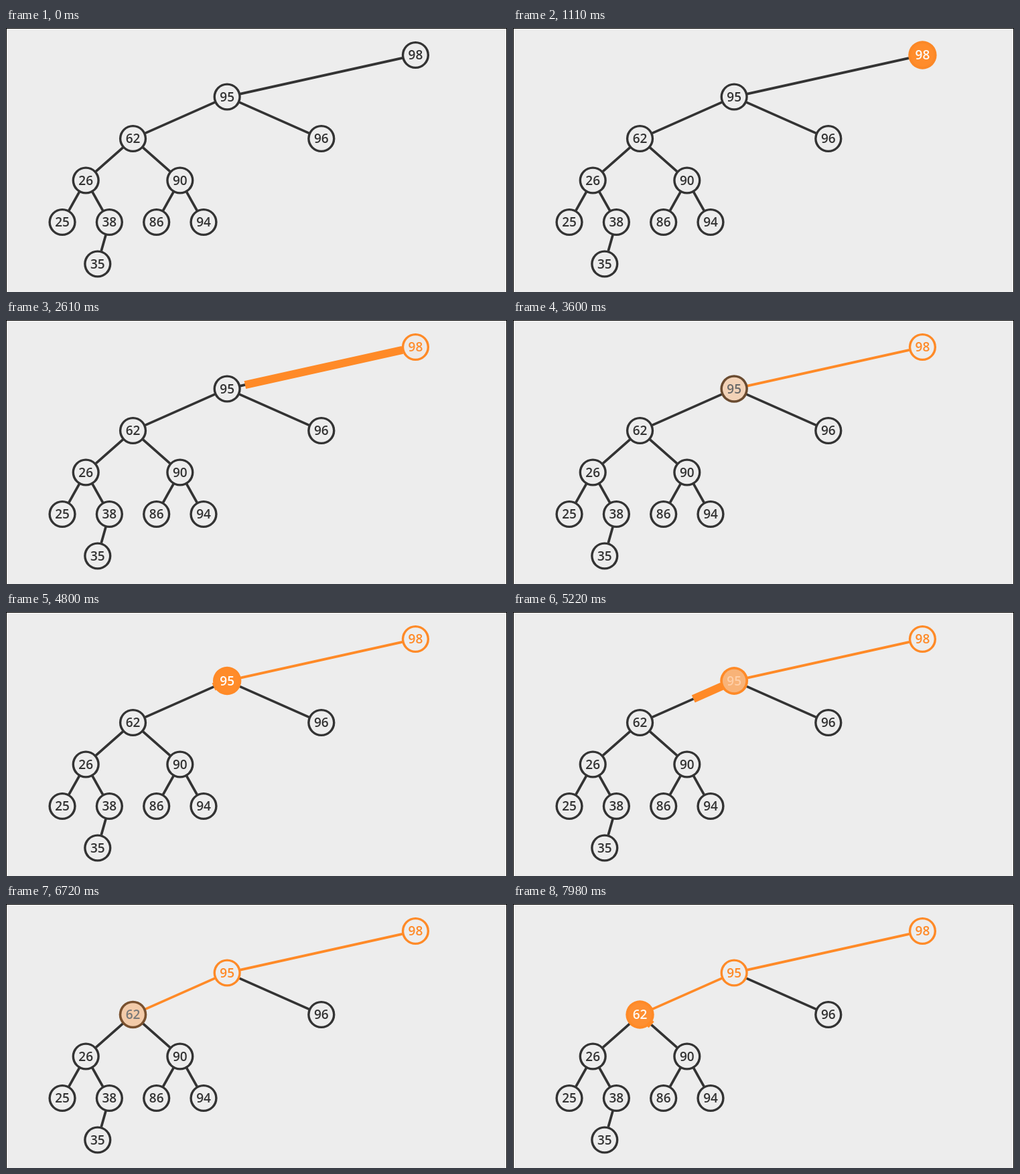
An HTML page with a canvas for the animation above (8 s loop, 748x395 px).

```html
<!DOCTYPE html>
<html lang="en">
<head>
<meta charset="utf-8">
<title>Tree search</title>
<style>
  html, body { margin: 0; width: 100%; height: 100%; overflow: hidden; background: #ededed; }
  canvas { display: block; width: 748px; height: 395px; }
</style>
</head>
<body>
<canvas id="stage"></canvas>
<script>
const W = 748, H = 395, LOOP = 8000;
const STEP = 1537.5, FIRST = -37, DURATION = 1380;
const RIM = 20, RING = 20.6, INNER = 17.2;
const BG = [237, 237, 237], DARK = [51, 51, 51], ORANGE = [255, 138, 39], WHITE = [255, 255, 255];

const canvas = document.getElementById('stage');
const ctx = canvas.getContext('2d');
const dpr = window.devicePixelRatio || 1;
canvas.width = Math.round(W * dpr);
canvas.height = Math.round(H * dpr);

// Each child sits half the previous horizontal gap away from its parent.
const nodes = [], edges = [];
function plant([value, left, right], x = 611.4, depth = 0) {
  const node = { value, x, y: 40.5 + depth * 62.5 };
  nodes.push(node);
  const gap = 281.25 / 2 ** depth;
  [[left, -1], [right, 1]].forEach(([child, side]) => {
    if (child) edges.push({ from: node, to: plant(child, x + side * gap, depth + 1) });
  });
  return node;
}
plant([98,
  [95,
    [62,
      [26, [25], [38, [35]]],
      [90, [86], [94]]],
    [96]]]);

// Search path: visiting a node and walking to the next one alternate.
const path = [98, 95, 62, 90];

const mix = (a, b, k) => a.map((v, i) => v + (b[i] - v) * k);
const css = c => `rgb(${c.map(Math.round).join(',')})`;
const ease = u => u < 0.5 ? 4 * u ** 3 : 1 - 4 * (1 - u) ** 3;

function progress(step, t) {
  const u = (t - FIRST - step * STEP) / DURATION;
  return ease(Math.min(1, Math.max(0, u)));
}

function line(x1, y1, x2, y2, width, color) {
  ctx.lineWidth = width;
  ctx.strokeStyle = css(color);
  ctx.beginPath();
  ctx.moveTo(x1, y1);
  ctx.lineTo(x2, y2);
  ctx.stroke();
}

function disc(x, y, r, color) {
  ctx.fillStyle = css(color);
  ctx.beginPath();
  ctx.arc(x, y, r, 0, Math.PI * 2);
  ctx.fill();
}

function drawEdge({ from, to }, t) {
  const dx = to.x - from.x, dy = to.y - from.y, len = Math.hypot(dx, dy);
  const ux = dx / len, uy = dy / len;
  const x = from.x + ux * RIM, y = from.y + uy * RIM;
  const span = len - 2 * RIM;
  const i = path.indexOf(from.value);
  const walked = i >= 0 && path[i + 1] === to.value ? progress(2 * i + 1, t) : 0;

  line(x, y, x + ux * span, y + uy * span, 3.75, walked === 1 ? ORANGE : DARK);
  if (walked > 0 && walked < 1) {
    line(x, y, x + ux * span * walked, y + uy * span * walked, 12, ORANGE);
  }
}

function drawNode({ value, x, y }, t) {
  const i = path.indexOf(value);
  const lit = i < 0 ? 0 : progress(2 * i, t);
  const left = i < 0 ? 0 : progress(2 * i + 1, t);

  disc(x, y, RING + 0.6 * lit * (1 - left), mix(DARK, ORANGE, lit));
  disc(x, y, INNER, mix(mix(BG, ORANGE, lit), BG, left));
  ctx.fillStyle = css(mix(mix(DARK, WHITE, lit), ORANGE, left));
  ctx.fillText(value, x, y + 6.6);
}

function draw(t) {
  ctx.setTransform(dpr, 0, 0, dpr, 0, 0);
  ctx.fillStyle = css(BG);
  ctx.fillRect(0, 0, W, H);
  ctx.font = '600 19px "Open Sans", "Noto Sans", sans-serif';
  ctx.textAlign = 'center';
  ctx.textBaseline = 'alphabetic';

  edges.forEach(e => drawEdge(e, t));
  nodes.forEach(n => drawNode(n, t));

  ctx.fillStyle = '#000';
  ctx.fillRect(0, 0, W, 1);
  ctx.fillRect(0, 0, 1, H);
  ctx.fillRect(W - 1, 0, 1, H);
}

const start = performance.now();
function tick() {
  draw((performance.now() - start) % LOOP);
  requestAnimationFrame(tick);
}
tick();
</script>
</body>
</html>
```
